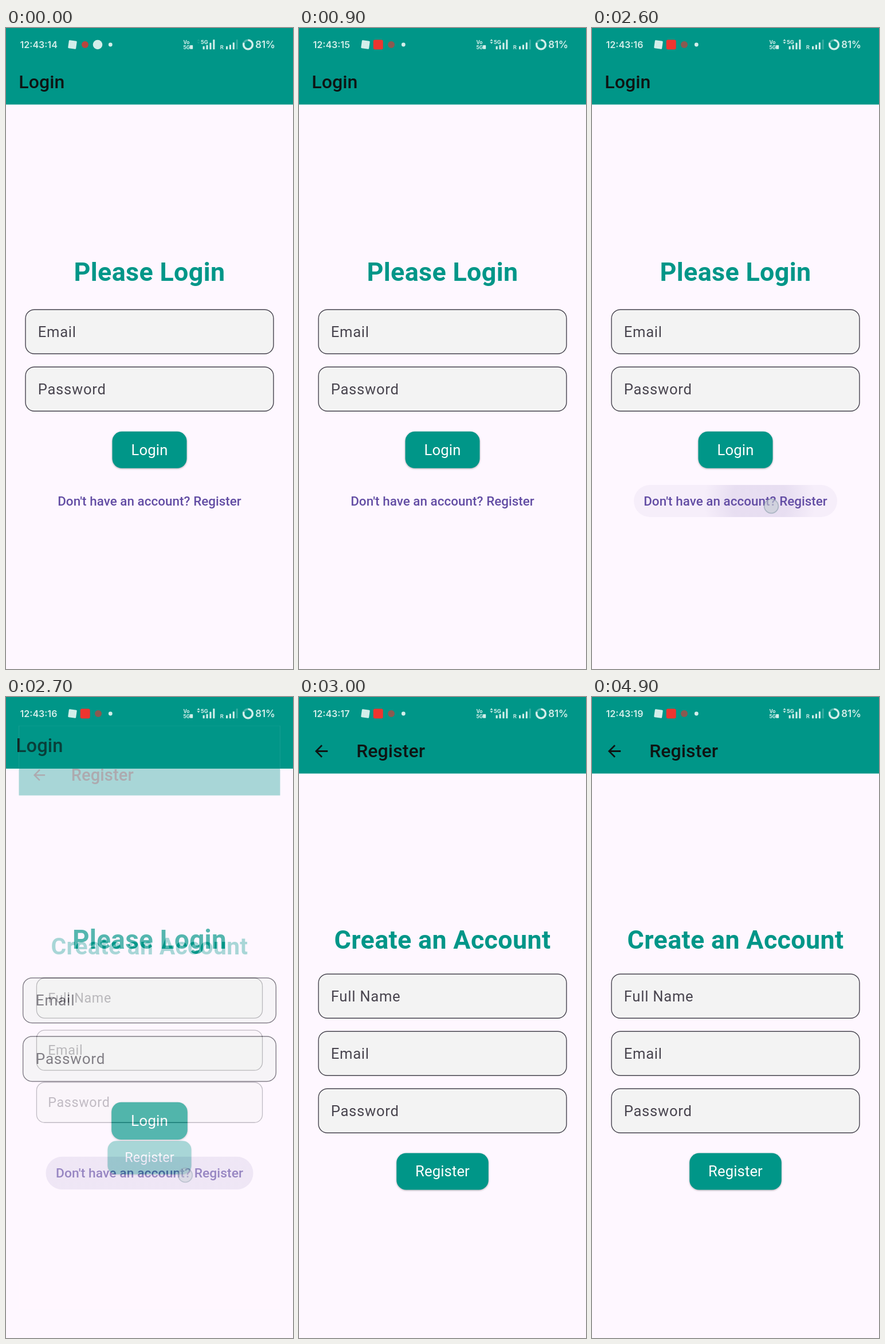
An HTML page that plays this animation: 501 px wide and 1118 px high, repeating every 5 s.

```html
<!DOCTYPE html>
<html lang="en">
<head>
<meta charset="utf-8">
<title>Login and register</title>
<style>
  html, body { margin: 0; width: 100%; height: 100%; overflow: hidden; background: #fef7ff; }
  svg { display: block; width: 501px; height: 1118px; overflow: hidden; }
  text { font-family: Roboto, "Noto Sans", sans-serif; white-space: pre; }
  .bar { font-size: 32px; font-weight: 500; letter-spacing: .1px; fill: #0e1413; }
  .title { font-size: 44.8px; font-weight: 700; letter-spacing: .35px; fill: #009688; text-anchor: middle; }
  .label { font-size: 25.6px; letter-spacing: .75px; fill: #49454f; }
  .action { font-size: 25.6px; letter-spacing: .14px; fill: #fff; text-anchor: middle; }
  .link { font-size: 22.4px; font-weight: 500; letter-spacing: .04px; fill: #634da4; text-anchor: middle; }
  .field { fill: #f3f3f3; stroke: #45424d; stroke-width: 1.4; }
  .button { fill: #009688; filter: drop-shadow(0 1.6px 1.4px rgba(0, 0, 0, .32)); }
  #status { fill: #d3eeea; }
  #status text { font-family: Inter, Roboto, sans-serif; font-weight: 600; }
  #status .tiny { font-weight: 700; }
</style>
</head>
<body>
<svg viewBox="0 0 501 1118">
  <defs>
    <clipPath id="pillClip"><rect x="73" y="797" width="355" height="56" rx="28"/></clipPath>
    <radialGradient id="glow">
      <stop offset=".5" stop-color="#6750a4" stop-opacity=".1"/>
      <stop offset="1" stop-color="#6750a4" stop-opacity="0"/>
    </radialGradient>
  </defs>
  <g id="login"></g>
  <rect id="scrim" width="501" height="1118" fill="#fef7ff"/>
  <g id="register"></g>
  <g id="status"></g>
  <circle id="touch" cx="313" cy="834" r="12.3" fill="#c3cbd2" fill-opacity=".62" stroke="#8da0ad" stroke-opacity=".6" stroke-width="1.8"/>
</svg>
<script>
const $ = id => document.getElementById(id);
const clamp = v => Math.min(1, Math.max(0, v));
const CX = 250.5, CY = 559;

// Markup helpers
const text = (cls, x, y, s) => `<text class="${cls}" x="${x}" y="${y}">${s}</text>`;
const rect = (x, y, w, h, more = '') => `<rect x="${x}" y="${y}" width="${w}" height="${h}" ${more}/>`;
const backdrop = rect(0, 0, 501, 1118, 'fill="#fef7ff"') + rect(0, 0, 501, 133.5, 'fill="#009688"');
const field = (y, s) =>
  rect(34, y, 433, 77, 'rx="15.5" class="field"') + text('label', 55.7, y + 47.3, s);
const button = (y, w, s) =>
  rect(CX - w / 2, y, w, 64, 'rx="16.7" class="button"') + text('action', CX, y + 40.8, s);

$('login').innerHTML = backdrop +
  text('bar', 22.3, 105.3, 'Login') +
  text('title', CX, 441, 'Please Login') +
  field(491.3, 'Email') + field(591.3, 'Password') +
  button(703.8, 130, 'Login') +
  `<g id="ink" clip-path="url(#pillClip)">
    ${rect(73, 797, 355, 56, 'fill="#6750a4" fill-opacity=".05"')}
    <circle id="ripple" cy="825" fill="url(#glow)"/>
  </g>` +
  text('link', CX, 832.6, "Don't have an account? Register");

$('register').innerHTML = backdrop +
  `<path transform="translate(22.3 77.8) scale(1.392)" fill="#0e1413"
    d="M20 11H7.83l5.59-5.59L12 4l-8 8 8 8 1.41-1.41L7.83 13H20z"/>` +
  text('bar', 100.2, 105.3, 'Register') +
  text('title', CX, 438.5, 'Create an Account') +
  field(483.3, 'Full Name') + field(583.3, 'Email') + field(683.3, 'Password') +
  button(795.5, 160.5, 'Register');

// Status bar
const signal = (x, heights, dimLast) => heights.map((h, i) =>
  rect(x + i * 5.9, 37.3 - h, 3.1, h, `rx=".6" opacity="${dimLast && i === 3 ? .25 : 1}"`)).join('');
const ring = 2 * Math.PI * 7.9;
const stat = (x, y, size, s, more = '') =>
  `<text x="${x}" y="${y}" font-size="${size}" ${more}>${s}</text>`;

$('status').innerHTML =
  stat(24.6, 35, 16, '', 'id="clock"') +
  rect(109, 22, 14, 14, 'rx="1.5" transform="rotate(8 116 29)"') +
  '<circle id="round" cx="160" cy="29" r="8.3"/>' +
  '<circle id="red" cy="29" r="6" fill="#b8463f"/>' +
  rect(129.7, 20.4, 17, 17, 'id="rec" rx="3" fill="#ee352f"') +
  '<circle cx="182.3" cy="29" r="3.4"/>' +
  stat(309.5, 28.4, 8.5, 'Vo', 'class="tiny"') +
  stat(309.5, 36.8, 8.5, '5G', 'class="tiny"') +
  rect(321, 30, 5.2, 6.8, 'rx=".8"') +
  '<path id="arrows" d="M333.4 22.4l2.6-3 2.6 3zM333.4 24.4l2.6 3 2.6-3z"/>' +
  stat(340, 27.6, 9.2, '5G', 'class="tiny"') +
  signal(343.6, [5.5, 7.5, 11.5, 17]) +
  stat(373.8, 37.3, 9.4, 'R') +
  signal(384, [5.5, 8, 12, 17], true) +
  `<g fill="none" stroke="#d3eeea" stroke-width="3.4" transform="rotate(-90 422.5 29)">
    <circle cx="422.5" cy="29" r="7.9" opacity=".35"/>
    <circle cx="422.5" cy="29" r="7.9" stroke-dasharray="${ring * .81} ${ring}"/>
  </g>` +
  stat(435.2, 35.2, 16.8, '81%');

// Cubic Bezier easing solved by bisection
function bezier(x1, y1, x2, y2) {
  const at = (a, b, s) => 3 * (1 - s) ** 2 * s * a + 3 * (1 - s) * s * s * b + s ** 3;
  return x => {
    let lo = 0, hi = 1;
    for (let i = 0; i < 30; i++) {
      const mid = (lo + hi) / 2;
      if (at(x1, x2, mid) < x) lo = mid; else hi = mid;
    }
    return at(y1, y2, lo);
  };
}
const lift = bezier(.05, 0, .133333, .06);
const settle = bezier(.208333, .82, .25, 1);
const SPLIT = .166;
const zoom = t => t <= 0 ? 0 : t >= 1 ? 1
  : t < SPLIT ? .4 * lift(t / SPLIT)
  : .4 + .6 * settle((t - SPLIT) / (1 - SPLIT));

const LOOP = 5000, STEP = 100, PUSH = 2650, PUSH_TIME = 300;
const TICKS = [900, 1900, 3000, 3900, 4900];
// time: ripple centre, ripple radius, ink opacity, touch opacity
const TAP = {
  2500: [308, 40, .6, .8],
  2600: [293, 98, 1, 1],
  2700: [258, 360, 1.4, .75],
  2800: [250, 400, 1, .17]
};

const set = (id, attrs) => {
  for (const k in attrs) $(id).setAttribute(k, attrs[k]);
};
const scaled = s => `translate(${CX} ${CY}) scale(${s}) translate(${-CX} ${-CY})`;

function draw(time) {
  $('clock').textContent = '12:43:' + (14 + TICKS.filter(t => time >= t).length);

  const p = clamp((time - 300) / 300);
  set('red', { cx: 138 + 23 * p, opacity: 1 - .25 * p });
  set('rec', { opacity: p });
  set('round', { opacity: 1 - p });
  set('arrows', { opacity: .15 + .85 * p });

  const t = clamp((time - PUSH) / PUSH_TIME), z = zoom(t);
  set('login', { transform: scaled(1 + .05 * z), visibility: t < 1 ? 'visible' : 'hidden' });
  set('scrim', { opacity: .6 * clamp((t - .2075) / .21) });
  set('register', { transform: scaled(.85 + .15 * z), opacity: clamp((t - .125) / .125) });

  const [cx, r, ink, touch] = TAP[time] || [313, 0, 0, 0];
  set('ripple', { cx, r });
  set('ink', { opacity: Math.min(1, ink) });
  set('touch', { opacity: touch, 'stroke-width': time < 2800 ? 1.8 : 0 });
}

const start = performance.now();
function tick() {
  const elapsed = (performance.now() - start) % LOOP;
  draw(Math.floor(elapsed / STEP) * STEP);
  requestAnimationFrame(tick);
}
tick();
</script>
</body>
</html>
```
